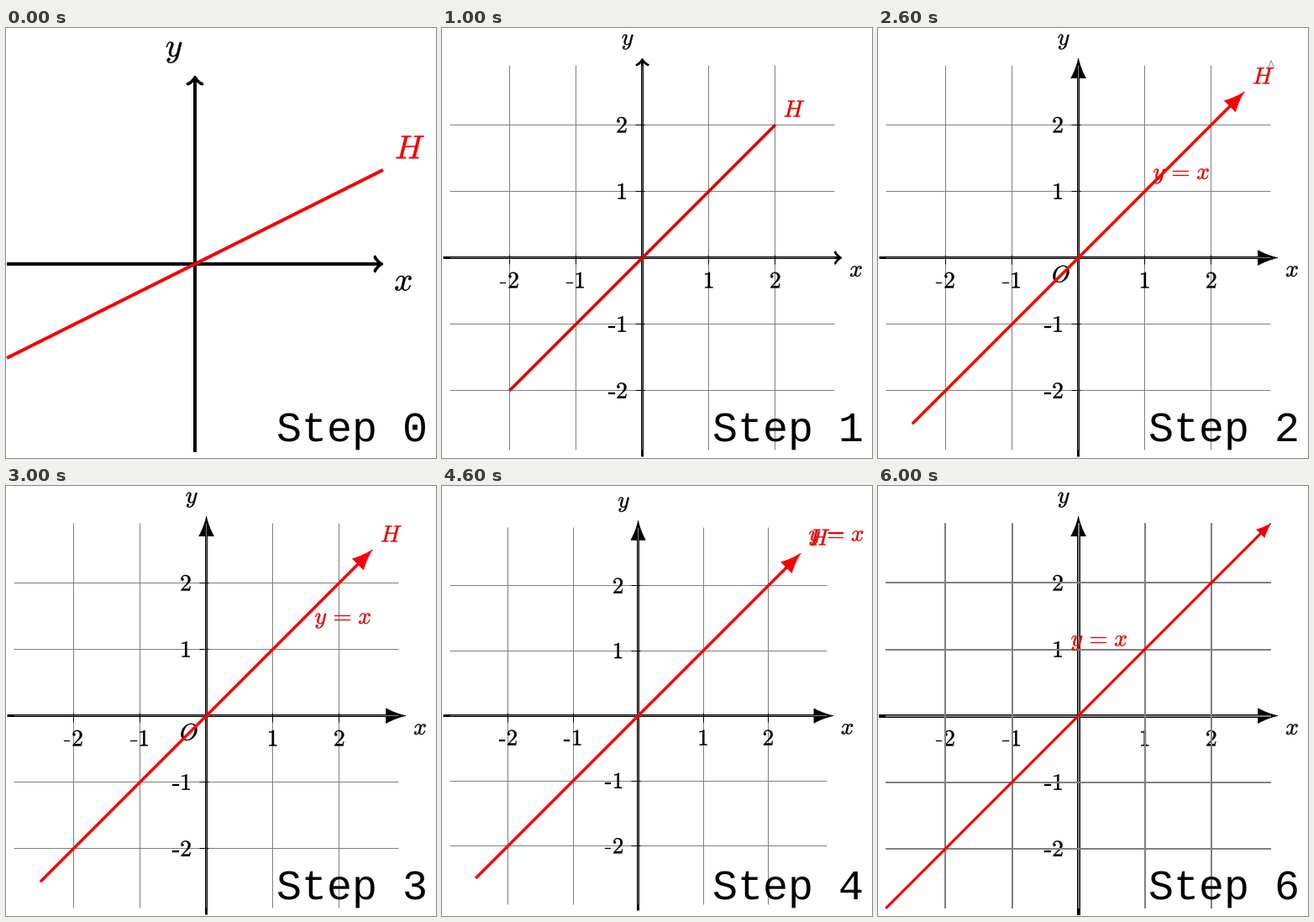
A matplotlib script for the animation above (7 s loop, 512x512 px).

```python
import matplotlib.pyplot as plt
import numpy as np
from matplotlib.animation import FuncAnimation
from matplotlib.patches import PathPatch, Polygon, Rectangle
from matplotlib.path import Path
from matplotlib.textpath import TextPath
from matplotlib.transforms import Affine2D

SIZE, DPI = 512, 128
PX = 72 / DPI  # points per pixel
GRAY = "#808080"
INK, GRID, NOTE, RED = 1, 2, 3, 4  # stacking order

plt.rcParams["mathtext.fontset"] = "cm"
plt.rcParams["text.hinting"] = "none"

fig = plt.figure(figsize=(SIZE / DPI, SIZE / DPI), dpi=DPI, facecolor="white")
ax = fig.add_axes([0, 0, 1, 1])


def line(p, q, width, color="black", z=INK, **style):
    ax.plot([p[0], q[0]], [p[1], q[1]], color=color, lw=width * PX, zorder=z,
            solid_capstyle="butt", dash_capstyle="butt", **style)


def straight(p, q, width, color="black", z=INK):
    """Horizontal or vertical line on the pixels that hold its centre."""
    shift = round(width) % 2 / 2
    line(np.subtract(p, shift), np.subtract(q, shift), width, color, z)


def bar(x, y, em, x0, x1, y0, y1, color, z):
    """Flat stroke of a character, in em units above the baseline."""
    ax.add_patch(Rectangle((x + x0 * em, y - y1 * em), (x1 - x0) * em,
                           (y1 - y0) * em, color=color, lw=0.3 * PX, zorder=z))


def glyph(char, x, y, em, color="black", z=INK):
    path = TextPath((0, 0), f"${char}$", size=em)
    path = Affine2D().scale(1, -1).translate(x, y).transform_path(path)
    ax.add_patch(PathPatch(path, color=color, lw=0.4 * PX, zorder=z))


def number(n, x, y, em, z):
    if n < 0:
        bar(x, y, em, 0.011, 0.276, 0.187, 0.245, "black", z)
        x += em / 3
    glyph(abs(n), x, y, em, z=z)


def equation(x, y, em, color):
    glyph("y", x, y, em, color, RED)
    for low in (0.130, 0.324):
        bar(x + 0.804 * em, y, em, 0.056, 0.722, low, low + 0.046, color, RED)
    glyph("x", x + 1.860 * em, y, em, color, RED)


def place(path, tip, direction):
    angle = np.arctan2(direction[1], direction[0])
    return Affine2D().rotate(angle).translate(*tip).transform_path(path)


def solid_arrow(p, tip, width, length, color="black", z=INK, shaft=line):
    """Line ending in a filled, slightly concave head."""
    step = np.subtract(tip, p)
    unit = step / np.hypot(*step)
    shaft(p, tip - unit * (length - 1), width, color, z)
    a = length / 10
    side = np.array([(0, 0), (-2.667, 0.5), (-7, 2), (-10, 3.8)])
    verts = np.vstack([side, side[::-1] * (1, -1)]) * a
    codes = [Path.MOVETO] + [Path.CURVE4] * 3 + [Path.LINETO] + [Path.CURVE4] * 3
    head = place(Path(verts, codes), tip, unit)
    ax.add_patch(PathPatch(head, color=color, lw=0.7 * PX, zorder=z))


def barb_arrow(p, tip, width, a):
    """Line ending in two curved open barbs."""
    step = np.subtract(tip, p)
    unit = step / np.hypot(*step)
    apex = tip - unit * 0.4 * width
    straight(p, apex, width)
    side = np.array([(-3.75, 4), (-3.5, 2.5), (-0.75, 0.25), (0, 0)])
    verts = np.vstack([side, side[-2::-1] * (1, -1)]) * a
    head = place(Path(verts, [Path.MOVETO] + [Path.CURVE4] * 6), apex, unit)
    ax.add_patch(PathPatch(head, fill=False, lw=0.9 * width * PX, zorder=INK,
                           capstyle="round", joinstyle="round"))


def axis_names(ox, oy, unit, reach, em):
    sep = em / 3
    glyph("x", ox + reach * unit + sep, oy + sep + 0.47 * em, em)
    glyph("y", ox - sep - 0.56 * em, oy - reach * unit - sep - 0.25 * em, em)


def plane(ox, oy, unit, head="solid", axis=3, grid=1, numbers=NOTE):
    """Axes and grid, with ticks and numbers above or below the grid."""
    em = unit * 0.3515
    pt = em / 10
    reach = 3 * unit
    for p, tip in (((ox - reach, oy), (ox + reach, oy)),
                   ((ox, oy + reach), (ox, oy - reach))):
        if head == "barb":
            barb_arrow(p, tip, axis, 1.7)
        else:
            solid_arrow(p, tip, axis, 0.84 * em, shaft=straight)
    axis_names(ox, oy, unit, 3, em)

    edge = 2.9 * unit
    for n in range(-2, 3):
        x, y = ox + n * unit, oy - n * unit
        straight((x, oy - edge), (x, oy + edge), grid, GRAY, GRID)
        straight((ox - edge, y), (ox + edge, y), grid, GRAY, GRID)
        if n == 0:
            continue
        wide = em * (0.833 if n < 0 else 0.5)
        straight((x, oy - pt), (x, oy + 3 * pt), 1, z=numbers)
        straight((ox - 3 * pt, y), (ox + pt, y), 1, z=numbers)
        number(n, x - wide / 2, oy + 12.9 * pt, em, numbers)
        number(n, ox - 6.33 * pt - wide, y + 0.33 * em, em, numbers)
    return em


def half_slope():
    ox, oy, unit = 225, 281, 112
    em = 39.4
    barb_arrow((ox - 2 * unit, oy), (ox + 2 * unit, oy), 4, 2.15)
    barb_arrow((ox, oy + 2 * unit), (ox, oy - 2 * unit), 4, 2.15)
    axis_names(ox, oy, unit, 2, em)
    red = "#f40000"
    line((ox - 2 * unit, oy + unit), (ox + 2 * unit, oy - unit), 4, red, RED)
    glyph("H", 463, 155.5, em, red, RED)


MAIN = (238.6, 273.6, 79.1)
BRIGHT, DARK = "#fa0000", "#dc0000"


def diagonal(origin, k):
    ox, oy, unit = origin
    return (ox - k * unit, oy + k * unit), (ox + k * unit, oy - k * unit)


def short_line():
    em = plane(*MAIN, head="barb")
    line(*diagonal(MAIN, 2), 3.6, DARK, RED)
    glyph("H", 406.5, 105.8, em, DARK, RED)


def named_arrow(origin, eq, h, at_origin=True):
    em = plane(*origin)
    solid_arrow(*diagonal(origin, 2.5), 3.5, 0.88 * em, BRIGHT, RED)
    glyph("H", *h, em, "#e60000", RED)
    equation(*eq, em, "#e60000")
    if at_origin:
        glyph("O", 207, 302.5, em, z=NOTE)


def arrow_low_label():
    named_arrow(MAIN, (327.5, 180), (446, 66.4))
    ax.add_patch(Polygon([(468, 38.5), (464.5, 48), (471.5, 48)], fill=False,
                         ec=GRAY, lw=0.9 * PX, zorder=GRID))


def arrow_side_label():
    named_arrow(MAIN, (367.5, 164), (446, 66.4))


def arrow_end_label():
    named_arrow((233.6, 273.6, 77.4), (436.5, 65.5), (437, 70.5), False)


def dashed_line():
    em = plane(*MAIN)
    width = 3.6
    dash = 0.3 * em / width  # dash length in line widths
    line(*diagonal(MAIN, 2.9), width, DARK, RED, ls=(0, (dash, dash)))
    equation(320.5, 98.2, em, DARK)


def heavy_grid():
    em = plane(*MAIN, axis=4, grid=2, numbers=INK)
    solid_arrow(*diagonal(MAIN, 2.9), 3.1, 0.63 * em, "#f00000", RED)
    equation(229.5, 190.5, em, "#e60000")


SCENES = [half_slope, short_line, arrow_low_label, arrow_side_label,
          arrow_end_label, dashed_line, heavy_grid]


def draw(step):
    ax.clear()
    ax.set(xlim=(0, SIZE), ylim=(SIZE, 0))
    ax.set_autoscale_on(False)
    ax.axis("off")
    SCENES[step]()
    ax.text(322, 492, f"Step {step}", family="Liberation Mono",
            fontsize=50 * PX, va="baseline", zorder=5)
    return []


anim = FuncAnimation(fig, draw, frames=len(SCENES), init_func=lambda: [],
                     interval=1000, repeat=True, repeat_delay=0)
plt.show()
```
